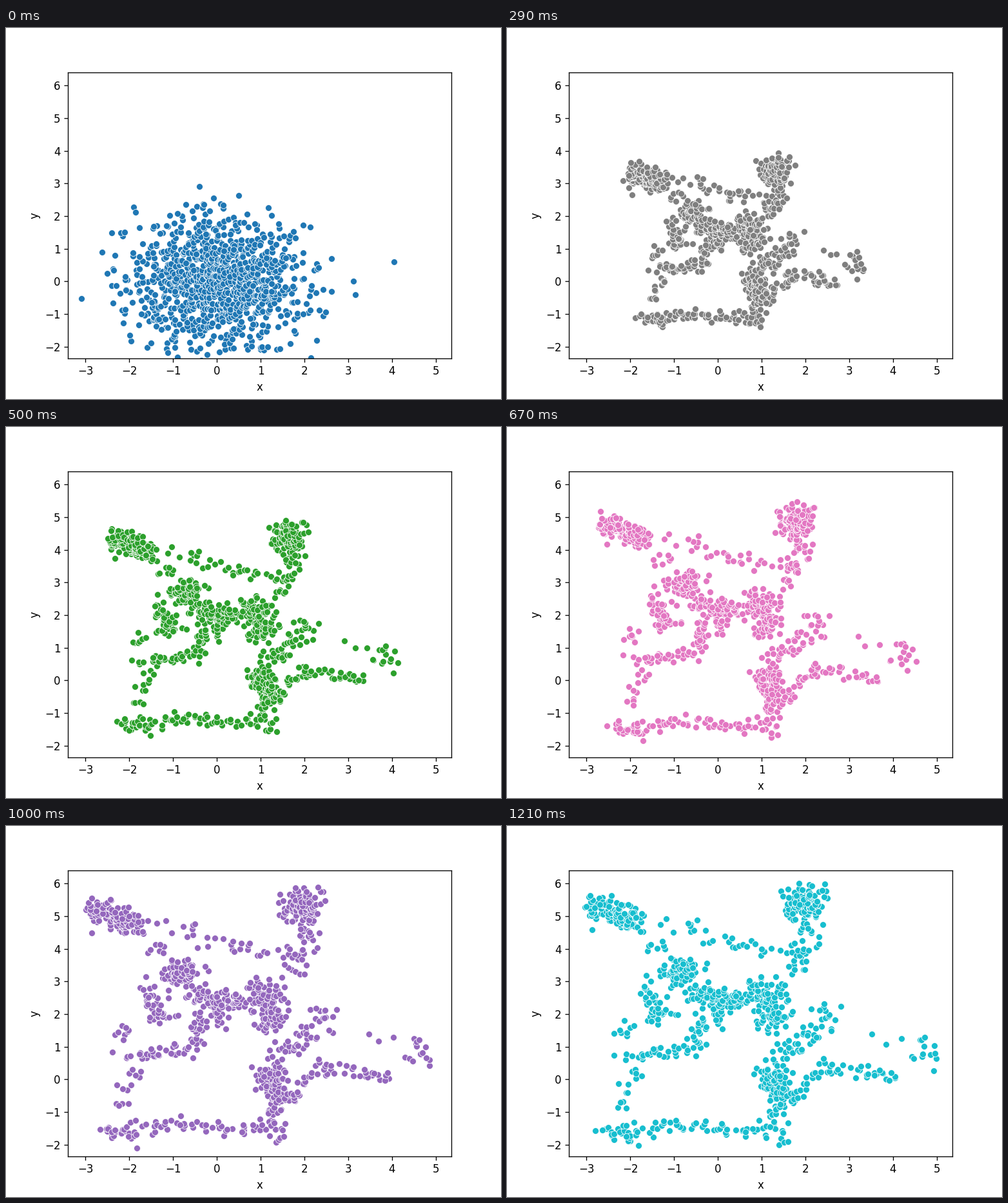
Write a matplotlib script that moves like this. It is 768 by 576 pixels and loops after 1250 ms.

```python
import numpy as np
import matplotlib.pyplot as plt
from matplotlib.animation import FuncAnimation

STEPS = 30
TICKS = 125      # 10 ms each, so that every step starts on a whole tick
TICK_MS = 10
GROWTH = 0.132   # how fast the figure expands
FADE = 0.35      # how fast the starting cloud is forgotten
JITTER = 0.045

rng = np.random.default_rng(7)


def stroke(n, spread, *points):
    """Scatter n points around a polyline."""
    points = np.array(points)
    lengths = np.hypot(*np.diff(points, axis=0).T)
    along = np.concatenate([[0], np.cumsum(lengths)])
    t = (np.arange(n) + rng.random(n)) / n * along[-1]
    line = np.column_stack([np.interp(t, along, axis) for axis in points.T])
    return line + rng.normal(0, spread, (n, 2))


def by_columns(p, rows=32):
    """Sort into vertical strips, then by height inside each strip."""
    strip = p[:, 0].argsort().argsort() // rows
    return p[np.lexsort((p[:, 1], strip))]


goal = np.vstack([
    # dense clusters
    stroke(150, 0.18, (-2.85, 5.38), (-1.85, 4.78)),
    stroke(120, 0.22, (1.97, 5.1), (1.97, 5.72)),
    stroke(75, 0.19, (-1.1, 3.15), (-0.55, 3.4)),
    stroke(85, 0.16, (-0.5, 2.65), (0.5, 2.35)),
    stroke(115, 0.18, (0.9, 2.95), (1.2, 2.4), (1.3, 1.65)),
    stroke(95, 0.17, (1.2, 0.4), (1.4, -0.65)),
    stroke(30, 0.15, (-2.5, -1.55), (-1.8, -1.75)),
    # right side
    stroke(34, 0.15, (2.1, 4.8), (2.0, 4.0), (1.6, 3.25)),
    stroke(45, 0.15, (1.35, 0.75), (1.95, 1.15), (2.3, 1.75), (2.6, 2.2)),
    stroke(55, 0.11, (1.5, -0.8), (1.9, -0.25), (2.5, 0.45), (3.2, 0.22),
           (4.1, 0.12)),
    stroke(24, 0.13, (1.3, -0.8), (1.2, -1.4), (1.6, -1.85)),
    stroke(3, 0.1, (3.4, 1.4), (4.3, 1.2)),
    stroke(14, 0.12, (4.45, 1.1), (4.85, 1.0), (4.6, 0.5)),
    # left side
    stroke(9, 0.13, (-1.6, 4.35), (-1.05, 3.8)),
    stroke(28, 0.18, (-1.2, 4.75), (0.0, 4.3), (1.4, 3.9)),
    stroke(34, 0.13, (-1.65, 2.9), (-1.5, 2.5), (-1.25, 1.85)),
    stroke(18, 0.1, (0.1, 2.3), (0.0, 1.65)),
    stroke(26, 0.12, (-0.3, 2.2), (-0.5, 0.95)),
    stroke(26, 0.08, (-0.5, 0.95), (-1.85, 0.68)),
    stroke(14, 0.13, (-0.8, 2.0), (-2.15, 1.75)),
    stroke(24, 0.16, (-2.2, 1.7), (-2.15, 0.95), (-1.8, 0.1), (-2.4, -0.9)),
    stroke(42, 0.11, (-1.7, -1.45), (-0.4, -1.4), (0.5, -1.65), (1.0, -1.45)),
])
start = rng.normal(0, 1, goal.shape)

# Pair each starting point with a goal in a similar direction.
start, goal = by_columns(start), by_columns(goal)


def positions(step):
    grow = (1 - np.exp(-GROWTH * step)) / (1 - np.exp(-GROWTH * (STEPS - 1)))
    noise = np.random.default_rng(step).normal(0, JITTER, goal.shape)
    return start * np.exp(-FADE * step) + goal * grow + noise


fig, ax = plt.subplots(figsize=(6.4, 4.8), dpi=120)
ax.set(xlim=(-3.403, 5.357), ylim=(-2.352, 6.398), xlabel="x", ylabel="y")
dots = ax.scatter(*start.T, s=36, edgecolor="white", linewidth=0.48)


def draw(tick):
    step = int((tick + 0.4) * STEPS / TICKS)
    dots.set_offsets(positions(step))
    dots.set_facecolor(f"C{step % 10}")
    return (dots,)


anim = FuncAnimation(fig, draw, frames=TICKS, interval=TICK_MS,
                     repeat=True, repeat_delay=0)
plt.show()
```
